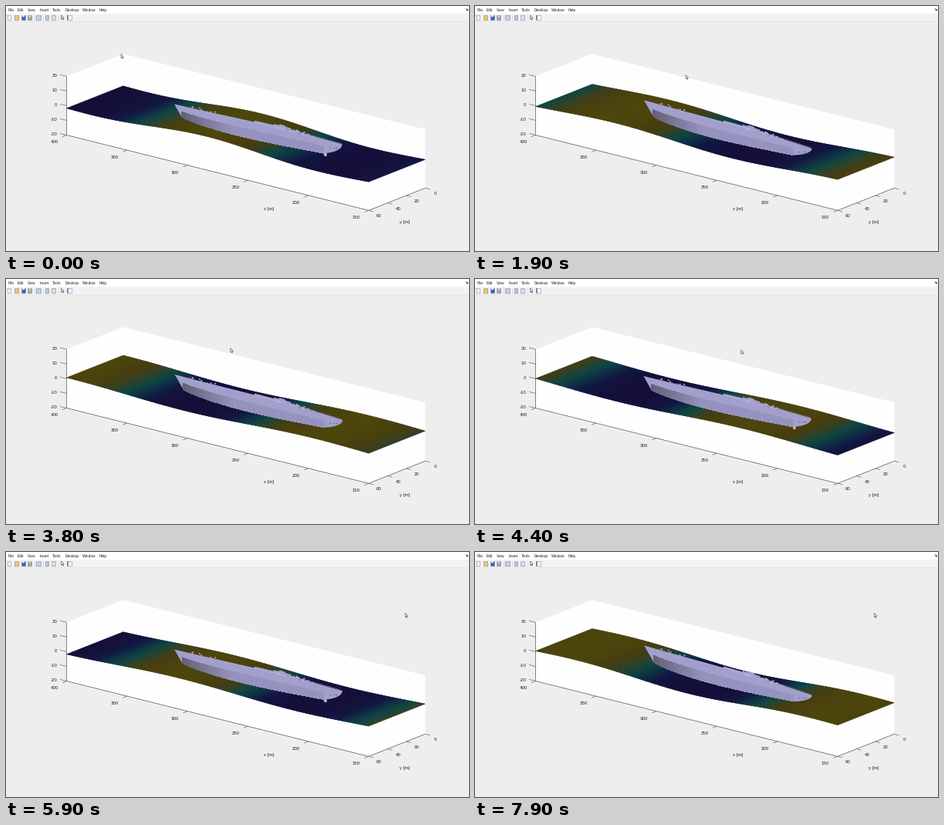
A matplotlib script for the animation above (8 s loop, 600 by 318 pixels).

```python
import numpy as np
import matplotlib.pyplot as plt
from matplotlib.animation import FuncAnimation
from matplotlib.collections import PolyCollection
from matplotlib.colors import LinearSegmentedColormap
from matplotlib.patches import Polygon, Rectangle

W, H, DPI = 600, 318, 100
FRAMES, STEP = 80, 100
PT = 72 / DPI
INK, AXIS = "#262626", "#555555"

fig = plt.figure(figsize=(W / DPI, H / DPI), dpi=DPI, facecolor="#eeeeee")
ax = fig.add_axes([0, 0, 1, 1])
ax.set_xlim(0, W)
ax.set_ylim(H, 0)
ax.axis("off")


def text(x, y, s, size=6.2, ha="center", color=INK):
    ax.text(x, y, s, fontsize=size * PT, ha=ha, va="center_baseline",
            family="Liberation Sans", color=color)


def line(pts, color=AXIS, lw=0.6, z=2):
    return ax.plot(*np.transpose(pts), color=color, lw=lw * PT, zorder=z,
                   solid_capstyle="butt")[0]


def poly(pts, color, z=2, edge="none", lw=0.0):
    return ax.add_patch(Polygon(pts, closed=True, fc=color, ec=edge,
                                lw=lw * PT, zorder=z))


def rect(x, y, w, h, color, edge="none", lw=0.5):
    ax.add_patch(Rectangle((x, y), w, h, fc=color, ec=edge, lw=lw * PT, zorder=2))


ARROW = np.array([(0, 0), (0, 5.2), (1.2, 4.2), (2, 6), (2.7, 5.7),
                  (2, 3.9), (3.6, 3.8)])


def draw_bars():
    rect(0, 0, W, 10, "white")
    rect(0, 10, W, 10, "#f2f2f2")
    line([(0, 20.2), (W, 20.2)], "#dcdcdc")
    menus = dict(File=2.5, Edit=14.5, View=28, Insert=43, Tools=60,
                 Desktop=77, Window=98.5, Help=121)
    for name, x in menus.items():
        text(x, 5.2, name, 4.9, "left", "#222222")
    for x in (37, 47.5, 68):
        line([(x, 12), (x, 18.5)], "#cccccc")
    icons = [(2, 4.2, "white"), (10.5, 5.2, "#edc95c"), (19.6, 5.2, "#4a60b4"),
             (28.4, 5, "#a4a8af"), (39.4, 5.2, "#c3d0e6"), (51.2, 3.8, "#b5c8e4"),
             (59.2, 5.2, "#dcdfea"), (79.2, 5.4, "white")]
    for x, w, color in icons:
        rect(x, 12.3, w, 5.2, color, "#6c7890")
    rect(1.3, 11.6, 1.6, 1.6, "#e8b93c")
    rect(20.8, 12.4, 2.8, 1.8, "#e6ecfa")
    rect(29.4, 11.8, 3, 2, "white", "#888888")
    rect(79.2, 12.3, 1.9, 5.2, "#6c87b8")
    poly(ARROW + (71.6, 12), "white", edge="#222222", lw=0.5)
    line([(595.8, 3.4), (598, 5.2)], "#333333", 0.8)
    poly([(598.6, 3.6), (598.6, 6), (596.4, 6)], "#333333")


# Corners of the axes box, on its floor
LEFT, FRONT, RIGHT = np.array([(78.5, 167.5), (470, 265.3), (543.3, 236.3)])
UP = np.array([0, -76.2])
DEPTH = RIGHT - FRONT


def ticks(start, span, labels, tick, offset, ha="center"):
    for k, label in zip(np.linspace(0, 1, len(labels)), labels):
        p = start + span * k
        line([p, p + tick])
        text(*(p + offset), str(label), ha=ha)


def draw_box():
    poly([LEFT, LEFT + UP, LEFT + UP + DEPTH, RIGHT + UP, RIGHT, FRONT],
         "#fefefe", 1)
    line([LEFT + UP, LEFT, FRONT, RIGHT], lw=0.7)
    ticks(LEFT, FRONT - LEFT, range(400, 149, -50), (-5.5, 2.2), (-16, 9))
    ticks(FRONT, DEPTH, range(60, -1, -20), (6, 1.5), (13.5, 7))
    ticks(LEFT, UP, range(-20, 21, 10), (-8.5, -2.1), (-12.5, -1.4), "right")
    text(341, 263, "x [m]")
    text(517, 280, "y [m]")


draw_bars()
draw_box()

# --- sea: one wave whose speed, length and height drift slowly ---
sea_map = LinearSegmentedColormap.from_list("sea", [
    (0, "#0d0733"), (0.22, "#0b0f3c"), (0.42, "#06353f"), (0.52, "#0c403a"),
    (0.68, "#333a18"), (0.82, "#433808"), (1, "#474005")])
u = np.linspace(0, 1, 161)
sea = PolyCollection([], linewidths=0.35, zorder=3)
ax.add_collection(sea)


def draw_sea(t):
    x = 78.5 + 391.5 * u
    phase = 0.36 + 1.2 * t - 0.55 * (1 - np.cos(2 * np.pi * t / 6.4))
    length = 330 + 18 * np.cos(2 * np.pi * (t - 1.9) / 8)
    wave = np.cos(phase + 2 * np.pi * (x - 275) / length)
    swell = 1.7 + 1.7 * np.cos(2 * np.pi * t / 10)
    height = 2.4 + swell * np.sin(np.pi * u)
    y = 130.4 + 96.4 * u - height * wave
    front = np.column_stack([x, y])
    back = front + DEPTH
    sea.set_verts(np.stack([front[:-1], front[1:], back[1:], back[:-1]], axis=1))
    colors = sea_map(0.5 + 0.25 * (wave[:-1] + wave[1:]))
    sea.set_facecolor(colors)
    sea.set_edgecolor(colors)


# --- ship: deck and keel are bent lines that tilt with the pitch ---
rng = np.random.default_rng(5)
tower_x = np.arange(322, 402, 2.5)
tower_h = rng.uniform(0, 2, tower_x.size) + 3.4 * np.exp(-((tower_x - 356) / 18) ** 2)
tower_h[tower_x < 346] = 2.4
gear_x = np.concatenate([rng.uniform(232, 274, 18), rng.uniform(346, 394, 30)])
gear_dy = rng.uniform(-3, 1.6, gear_x.size)
gear_r = rng.uniform(0.4, 1.3, gear_x.size)
gear_rgb = np.array([0.7, 0.69, 0.86]) * rng.uniform(0.8, 1.1, (gear_x.size, 1))

side_k = np.linspace(0, 1, 60)
side_map = LinearSegmentedColormap.from_list("side", [
    (0, "#646279"), (0.12, "#767391"), (0.35, "#9592be"), (1, "#9693bf")])

empty = [(0, 0)]
tower = poly(empty, "#a3a1ca", 4)
hull = poly(empty, "#a29fcd", 5)
side = PolyCollection([], facecolors=side_map(side_k[:-1]), lw=0, zorder=6,
                      antialiased=False)
rim = line(empty, "#b2b0d9", 0.9, 8)
rail = line(empty, "#77758f", 0.8, 8)
gear = PolyCollection([], facecolors=np.clip(gear_rgb, 0, 1), zorder=9)
ax.add_collection(side)
ax.add_collection(gear)
rudder = poly([(411.5, 190), (416, 190), (415.5, 195), (412.5, 195)], "#b9b8cc", 4)
ports = ax.scatter([], [], s=1.1, color="#5d5b78", lw=0, zorder=9)


def draw_ship(t):
    p = 0.5 - 0.5 * np.cos(2 * np.pi * (t + 0.1) / 5.35)
    bow = np.array([218.5 + p, 128 - 6 * p])
    stern = np.array([435.5 + p, 180 + 6.5 * p])
    fore = np.array([227.5 + 4 * p, 144 - p])
    aft = np.array([411 + 2 * p, 191 + 3 * p])

    def deck_y(x):
        s = np.clip((x - bow[0]) / (stern[0] - bow[0]), 0, 1)
        return bow[1] + (stern[1] - bow[1]) * s - 2 * np.sin(np.pi * s ** 1.5)

    deck_x = np.linspace(bow[0], stern[0], 40)
    deck = np.column_stack([deck_x, deck_y(deck_x)])
    keel = fore + np.outer(side_k, aft - fore)
    keel[:, 1] += (5.5 + p) * np.sin(np.pi * side_k ** 0.7)
    turn = np.linspace(0, np.pi / 2, 10)
    transom = np.column_stack([aft[0] + (stern[0] - aft[0]) * np.cos(turn),
                               stern[1] + (aft[1] - stern[1]) * np.sin(turn)])
    hull.set_xy(np.vstack([deck, transom, keel[::-1]]))
    rim.set_data(*deck.T)

    chine = keel.copy()
    chine[:, 1] += 0.5 * (deck_y(keel[:, 0]) - keel[:, 1])
    side.set_verts(np.stack([chine[:-1], chine[1:], keel[1:], keel[:-1]], axis=1))

    rail_x = np.linspace(376, 435, 12)
    rail.set_data(rail_x, deck_y(rail_x) - 1.2)

    xs = np.repeat(tower_x, 2)
    xs[1::2] += 2.5
    top = np.column_stack([xs, deck_y(xs) - np.repeat(tower_h, 2)])
    base = np.column_stack([xs, deck_y(xs) + 1])[::-1]
    tower.set_xy(np.vstack([top, base]))

    gear_y = deck_y(gear_x) + gear_dy
    gear.set_verts(np.stack([
        np.column_stack([gear_x + i * gear_r, gear_y + j * gear_r])
        for i, j in ((-1, -1), (1, -0.6), (1, 1), (-1, 0.7))], axis=1))

    port_x = np.array([420, 424.5, 428])
    ports.set_offsets(np.column_stack([port_x, deck_y(port_x) + 8.5 - (port_x - 420) / 3]))
    rudder.set_visible(p < 0.4)


# --- mouse pointer ---
pointer = poly(ARROW, "white", 12, "#444444", 0.55)
STOPS = np.array([(0, 149, 62.3), (1, 273, 89.3), (3.6, 273, 89.3),
                  (4.4, 344.7, 91.8), (5.5, 517.2, 79.3)]).T


def draw(i):
    t = i * STEP / 1000
    draw_sea(t)
    draw_ship(t)
    pointer.set_xy(ARROW + [np.interp(t, STOPS[0], axis) for axis in STOPS[1:]])
    return []


anim = FuncAnimation(fig, draw, frames=FRAMES, interval=STEP, repeat=True,
                     repeat_delay=0, blit=False)
plt.show()
```
